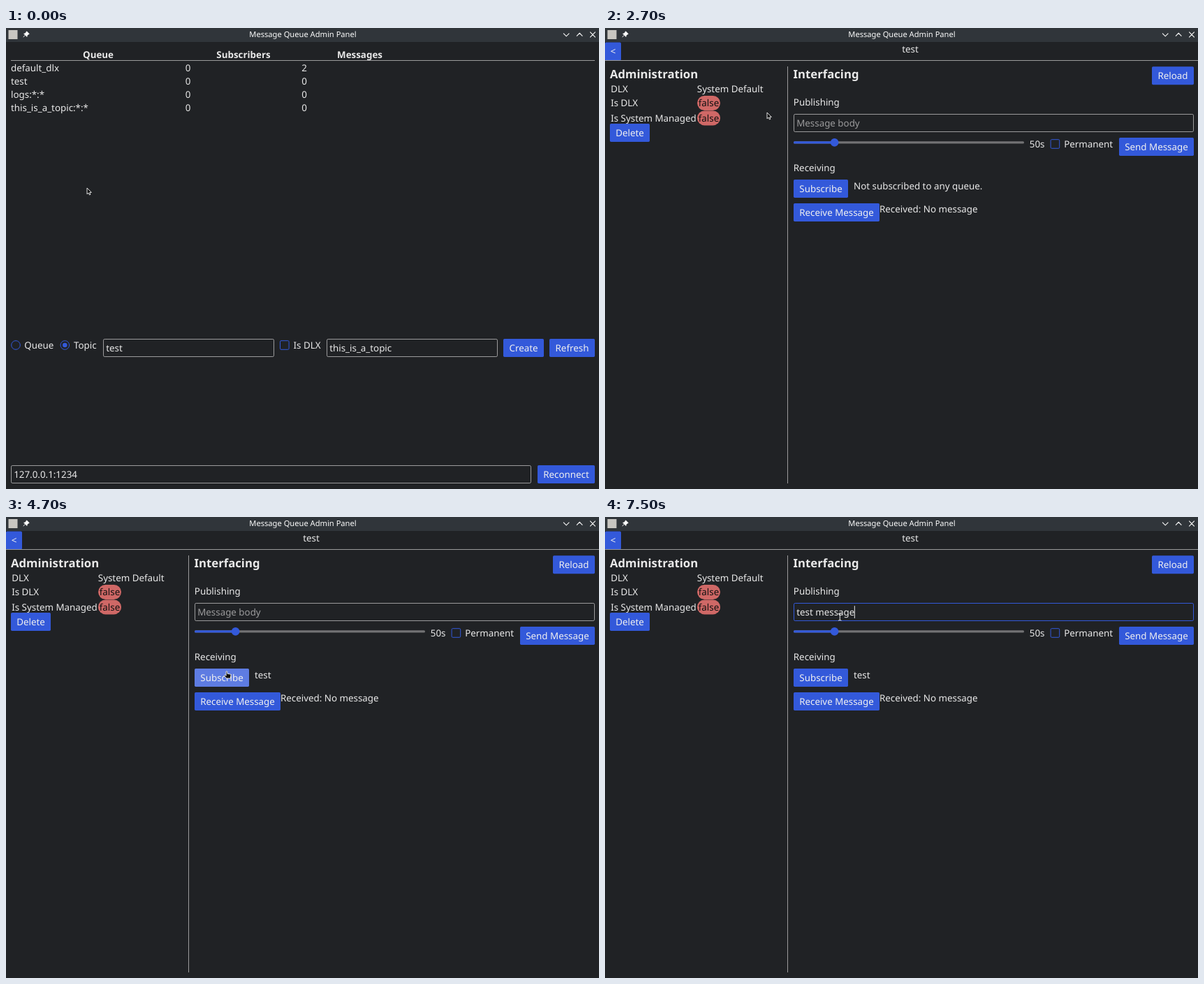
An HTML page for the animation above (8000 ms loop, 849 by 660 pixels).

```html
<!DOCTYPE html>
<html lang="en">
<head>
<meta charset="utf-8">
<title>Message Queue Admin Panel</title>
<style>
  html, body { margin: 0; width: 100%; height: 100%; overflow: hidden; background: #202225; }
  svg { display: block; width: 849px; height: 660px; }
  text {
    font: 13.36px "Noto Sans", sans-serif;
    fill: #e9e9e9;
    white-space: pre;
    text-rendering: geometricPrecision;
  }
  .mid { text-anchor: middle; }
  .bold { font-weight: 700; }
  .head { font-size: 16.7px; font-weight: 700; }
  .title { font-size: 11.15px; fill: #fcfcfc; }
  .btn rect { fill: #3359da; }
  .btn.hot rect { fill: #5e7ce2; }
  .btn text { fill: #f0f0f0; }
  .field { fill: none; stroke: #9b9b9c; }
  .ring { fill: none; stroke: #3359da; }
  .rule { fill: #9b9b9c; }
  .pill { fill: #cf6866; }
  .pill + text { fill: #111; }
  .row rect { fill: none; }
  .row.hot rect { fill: #17181a; stroke: #0b0b0c; }
  .row.hot text { fill: #969696; }
  .accent { fill: #3359da; }
  .hot .accent { fill: #5e7ce2; }
  .line { fill: none; stroke: #fcfcfc; stroke-width: 1.1; }
  .pointer { fill: #101112; stroke: #f4f4f4; stroke-width: .9; stroke-linejoin: round; }
</style>
</head>
<body>
<svg id="stage" viewBox="0 0 849 660"></svg>
<script>
const LOOP = 8000, STEP = 100;

const label = (x, y, s, cls = '', id = '') =>
  `<text x="${x}" y="${y}" class="${cls}" id="${id}">${s.replace('<', '&lt;')}</text>`;
const box = (x, y, w, h, cls, r = 0, id = '') =>
  `<rect x="${x}" y="${y}" width="${w}" height="${h}" rx="${r}" class="${cls}" id="${id}"/>`;
const button = (x, y, w, s, id = '') =>
  `<g class="btn" id="${id}">${box(x, y, w, 26, '', 1.7)}${label(x + w / 2, y + 17.9, s, 'mid')}</g>`;
const field = (x, y, w, id) => box(x + .5, y + .5, w - 1, 25, 'field', 1.7, id);
const check = (x, y) => box(x + .5, y + .5, 12.6, 12.6, 'ring', 1.5);
const radio = (x, y, on) => `<circle cx="${x}" cy="${y}" r="6.3" class="ring"/>` +
  (on ? `<circle cx="${x}" cy="${y}" r="3.3" class="accent"/>` : '');
const pill = y => box(132, y, 33, 21, 'pill', 10.4) + label(148.5, y + 15.2, 'false', 'mid');

const rowTop = i => 48.3 + 18.9 * i;
const rows = [['default_dlx', 2], ['test', 0], ['logs:*:*', 0], ['this_is_a_topic:*:*', 0]];
const row = ([name, count], i) => {
  const y = 61.8 + 18.9 * i;
  return `<g class="row">${box(7.5, rowTop(i) + .2, 582, 16, '')}${label(7, y, name)}` +
    label(260.6, y, '0', 'mid') + label(427, y, String(count), 'mid') + '</g>';
};

const titleBar = `
  <rect width="849" height="20" fill="#30353a"/>
  <rect x="3.5" y="3" width="13" height="13" fill="#c8c6c1"/>
  <path d="M29.5 4.8 L33.2 8.5 L32 9 L30.2 10.8 L29.9 12.4 L25.7 8.2 L27.3 7.9 L29 6.1Z M27.3 10.2 L24.8 13.2"
    fill="#fcfcfc" stroke="#fcfcfc" stroke-width=".9"/>
  ${label(425, 13.2, 'Message Queue Admin Panel', 'title mid')}
  <path class="line" d="M798 7.6 l4.2 4.2 l4.2 -4.2 M817 11.6 l4.2 -4.2 l4.2 4.2 M836.2 5.7 l7.6 7.6 m0 -7.6 l-7.6 7.6"/>`;

const listPage = '<g id="list">' +
  label(132, 42.8, 'Queue', 'mid bold') + label(340, 42.8, 'Subscribers', 'mid bold') +
  label(506.5, 42.8, 'Messages', 'mid bold') + box(7, 46, 836, 1, 'rule') +
  rows.map(row).join('') +
  radio(14, 454, false) + label(26.3, 458.9, 'Queue') +
  radio(84.3, 454, true) + label(97, 458.9, 'Topic') +
  field(139, 445, 245) + label(143.2, 463, 'test') +
  check(392, 447.2) + label(411.5, 458.9, 'Is DLX') +
  field(459, 445, 245) + label(463.2, 463, 'this_is_a_topic') +
  button(712, 445, 58, 'Create') + button(778, 445, 65, 'Refresh') +
  field(7, 626, 745) + label(11.2, 644, '127.0.0.1:1234') +
  button(761, 626, 82, 'Reconnect') + '</g>';

const queuePage = '<g id="queue">' +
  button(0, 20.5, 23, '<') + label(437, 34.7, 'test', 'mid') +
  box(0, 46, 849, 1, 'rule') + box(261, 55, 1, 597, 'rule') +
  label(7, 72, 'Administration', 'head') +
  label(8.2, 92.2, 'DLX') + label(131.8, 92.2, 'System Default') +
  label(8.2, 112.2, 'Is DLX') + pill(97) +
  label(8.2, 133.7, 'Is System Managed') + pill(118.4) +
  button(7, 137, 57, 'Delete') +
  label(269.6, 72, 'Interfacing', 'head') + button(783, 55.3, 60, 'Reload') +
  label(269.8, 111.2, 'Publishing') +
  field(270, 123, 573, 'body') + label(274.2, 141, '', '', 'typed') +
  box(0, 127.2, 1, 17.8, '', 0, 'caret') +
  `<g id="slider">${box(270, 162.2, 330, 3.4, 'rail', 1.6)}${box(270, 162.2, 58, 3.4, 'accent', 1.6)}
   <circle cx="328.6" cy="163.9" r="5.85" class="accent"/></g>` +
  label(607.8, 171.1, '50s') + check(637.6, 159.2) + label(657.2, 171.1, 'Permanent') +
  button(736, 157, 107, 'Send Message') +
  label(269.8, 204.9, 'Receiving') +
  button(270, 217, 78, 'Subscribe', 'subscribe') + label(356, 230.7, '', '', 'status') +
  button(270, 251, 123, 'Receive Message') + label(393, 264.4, 'Received: No message') + '</g>';

const pointers = `<g id="pointer">
  <path class="pointer" data-kind="arrow" d="M0 0 V8.8 L2 7.1 L3.5 10 L4.9 9.3 L3.6 6.7 L6.3 6.4Z"/>
  <path class="pointer" data-kind="hand" d="M-.9 .3 Q0 -.8 .9 .3 V3.2 L5.4 4.1 Q6.3 4.6 6 6 L5.2 10 H-.4 L-3.6 6.2 Q-3.6 5 -2.3 5.3 L-.9 6.3Z"/>
  <path data-kind="beam" d="M-2.2 -5 Q0 -5 0 -3.8 Q0 -5 2.2 -5 M0 -3.8 V3.8 M-2.2 5 Q0 5 0 3.8 Q0 5 2.2 5"
    fill="none" stroke="#e8e8e8" stroke-width="1"/></g>`;

document.getElementById('stage').innerHTML = titleBar + listPage + queuePage + pointers;

const $ = id => document.getElementById(id);
const rowEls = document.querySelectorAll('.row');
const kinds = document.querySelectorAll('[data-kind]');
document.querySelector('.rail').style.fill = '#727274';

// pointer: time, x, y
const path = [
  [600, 116, 229], [700, 110, 221], [800, 91, 190], [900, 65, 138], [1000, 44, 99],
  [1100, 33, 80], [1200, 29.9, 75], [2200, 29.9, 75], [2300, 40, 76], [2500, 125, 91],
  [2700, 232, 121], [2800, 273, 138], [2900, 295, 155], [3000, 306, 172], [3100, 311.5, 183],
  [3200, 314.3, 188.5], [3400, 314.5, 194.5], [3500, 314.5, 194.5], [3600, 314.5, 195],
  [3700, 314.5, 195], [3800, 314.6, 198], [4000, 315, 210], [4200, 315.8, 219], [4400, 316, 221],
  [5200, 316, 221], [5300, 318, 215], [5400, 325, 190], [5500, 333, 158], [5600, 336.3, 143.2]
];
const typing = [[6400, 't'], [6500, 'te'], [6600, 'tes'], [6700, 'test '], [6900, 'test me'],
  [7000, 'test mes'], [7200, 'test mess'], [7300, 'test messa'], [7400, 'test messag'], [7500, 'test message']];

function pointerAt(t) {
  const i = path.findIndex(p => p[0] > t);
  if (i === 0) return path[0].slice(1);
  if (i < 0) return path[path.length - 1].slice(1);
  const [a, b] = [path[i - 1], path[i]];
  const k = (t - a[0]) / (b[0] - a[0]);
  return [a[1] + (b[1] - a[1]) * k, a[2] + (b[2] - a[2]) * k];
}

const show = (el, on) => { el.style.display = on ? '' : 'none'; };

function draw(t) {
  const [x, y] = pointerAt(t);
  const inside = (l, top, r, bottom) => x >= l && x < r && y >= top && y < bottom;
  const onQueue = t >= 1600, focused = t >= 5700;
  show($('list'), !onQueue);
  show($('queue'), onQueue);
  rowEls.forEach((el, i) => el.classList.toggle('hot', inside(7, rowTop(i), 590, rowTop(i) + 17)));

  const overBody = onQueue && inside(270, 123, 843, 149);
  const overSlider = onQueue && inside(270, 157, 600, 171);
  const overSubscribe = onQueue && inside(270, 217, 348, 243);
  $('body').style.stroke = focused ? '#3359da' : overBody ? '#e6e6e6' : '';
  $('slider').classList.toggle('hot', overSlider);
  $('subscribe').classList.toggle('hot', overSubscribe && !(t >= 4600 && t < 4700));
  $('status').textContent = t < 4700 ? 'Not subscribed to any queue.' : 'test';

  const text = typing.reduce((s, [at, v]) => t >= at ? v : s, '');
  $('typed').textContent = text || 'Message body';
  $('typed').style.fill = text ? '' : '#9b9b9c';
  show($('caret'), focused && !(t >= 6200 && t < 6400));
  $('caret').style.fill = '#e9e9e9';
  $('caret').setAttribute('x', 273.7 + (text && onQueue ? $('typed').getComputedTextLength() : 0));

  const kind = overBody ? 'beam' : overSlider || overSubscribe ? 'hand' : 'arrow';
  kinds.forEach(el => show(el, el.dataset.kind === kind));
  $('pointer').setAttribute('transform', `translate(${x} ${y})`);
}

const start = performance.now();
function tick() {
  const t = (performance.now() - start) % LOOP;
  draw(Math.floor(t / STEP) * STEP);
  requestAnimationFrame(tick);
}
tick();
</script>
</body>
</html>
```
